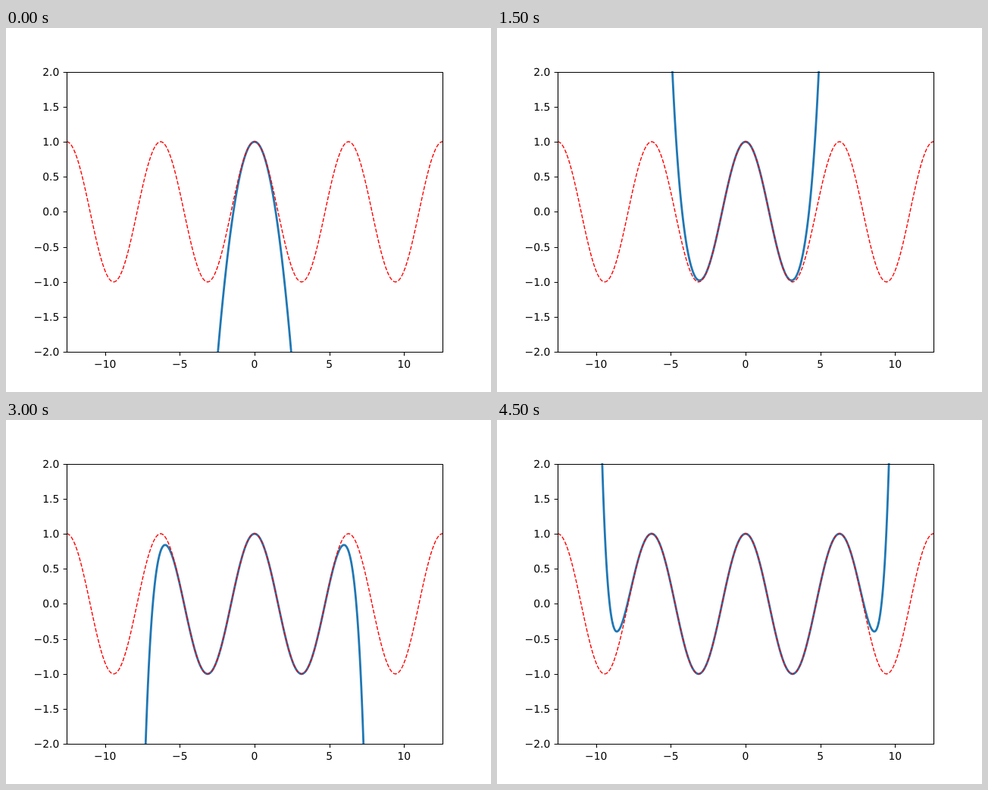
These frames come from a looping animation (640x480 px, 5 s). An HTML page:

```html
<!DOCTYPE html>
<html lang="en">
<head>
<meta charset="utf-8">
<title>Taylor polynomials of cosine</title>
<style>
  html, body { margin: 0; width: 100%; height: 100%; overflow: hidden; background: #fff; }
  svg { display: block; width: 640px; height: 480px; }
  path { fill: none; stroke-linejoin: round; }
  .taylor { stroke: #1f77b4; stroke-width: 2.78; opacity: 0; animation: show 5s step-end infinite; }
  .cosine { stroke: #f00; stroke-width: 1.39; stroke-dasharray: 5.14 2.22; }
  .axes { stroke: #000; stroke-width: 1.11; }
  text { font: 13.89px "DejaVu Sans", sans-serif; text-rendering: geometricPrecision; }
  .x { text-anchor: middle; }
  .y { text-anchor: end; }
  @keyframes show {
    0% { opacity: 1; }
    10%, 100% { opacity: 0; }
  }
</style>
</head>
<body>
<svg viewBox="0 0 640 480">
  <clipPath id="plot"><rect x="80" y="57.6" width="496" height="369.6"/></clipPath>
  <g id="curves" clip-path="url(#plot)"></g>
  <g id="frame"></g>
</svg>
<script>
  const X_MAX = 4 * Math.PI, SAMPLES = 800, TERMS = 10, STEP_MS = 500;
  const curves = document.getElementById('curves');
  const frame = document.getElementById('frame');
  const px = x => 328 + x * 248 / X_MAX;
  const py = y => 242.4 - y * 92.4;
  const snap = v => Math.floor(v + 0.5) + 0.5;

  function add(parent, tag, attrs, text = '') {
    const el = document.createElementNS('http://www.w3.org/2000/svg', tag);
    for (const name in attrs) el.setAttribute(name, attrs[name]);
    el.textContent = text;
    parent.append(el);
    return el;
  }

  function plot(fn, className) {
    const points = Array.from({ length: SAMPLES + 1 }, (_, i) => {
      const x = X_MAX * (2 * i / SAMPLES - 1);
      return px(x).toFixed(2) + ' ' + py(fn(x)).toFixed(2);
    });
    return add(curves, 'path', { class: className, d: 'M' + points.join('L') });
  }

  // Partial sum of the cosine series up to x^(2n)
  function taylor(x, n) {
    let term = 1, sum = 1;
    for (let k = 1; k <= n; k++) {
      term *= -x * x / ((2 * k - 1) * 2 * k);
      sum += term;
    }
    return sum;
  }

  const label = (value, digits) => value.toFixed(digits).replace('-', '\u2212');

  for (let n = 1; n <= TERMS; n++) {
    const curve = plot(x => taylor(x, n), 'taylor');
    curve.style.animationDelay = (n - 1 - TERMS) * STEP_MS + 'ms';
  }
  plot(Math.cos, 'cosine');

  let axes = 'M80.5 58.5H576.5V427.5H80.5Z';
  for (let x = -10; x <= 10; x += 5) {
    axes += `M${snap(px(x))} 427.5v4.86`;
    add(frame, 'text', { class: 'x', x: px(x), y: 448 }, label(x, 0));
  }
  for (let y = -2; y <= 2; y += 0.5) {
    const row = snap(py(y));
    axes += `M80.5 ${row}h-4.86`;
    add(frame, 'text', { class: 'y', x: 70.3, y: row + 4.5 }, label(y, 1));
  }
  add(frame, 'path', { class: 'axes', d: axes });
</script>
</body>
</html>
```
